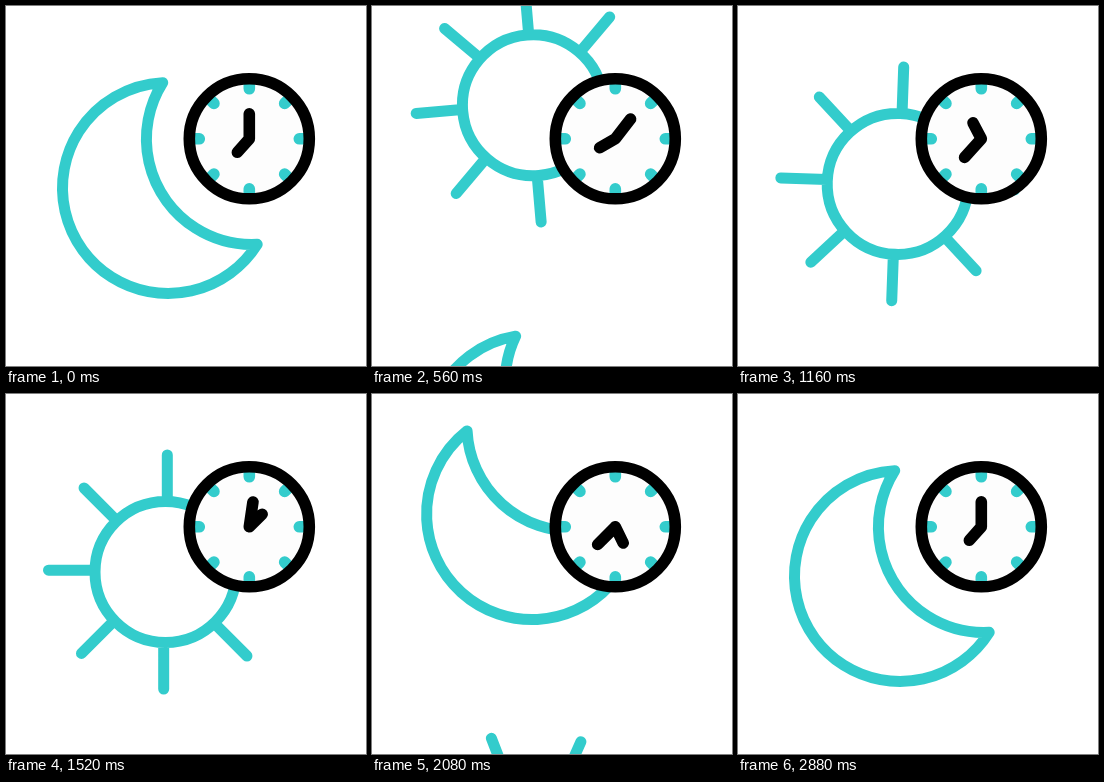
These frames come from a looping animation (360 by 360 pixels, 3 s). An HTML page with a canvas:

```html
<!DOCTYPE html>
<html>
<head>
<meta charset="utf-8">
<style>
  html, body { margin: 0; width: 100%; height: 100%; overflow: hidden; background: #fff; }
  canvas { display: block; }
</style>
</head>
<body>
<canvas id="stage" width="360" height="360"></canvas>
<script>
const ctx = document.getElementById('stage').getContext('2d');
const TEAL = '#33cccc', LOOP = 3000, STEP = 40, RAD = Math.PI / 180;

const progress = (t, start, length) => Math.min(1, Math.max(0, (t - start) / length));
const smooth = x => x * x * (3 - 2 * x);
const easeOut = x => 1 - (1 - x) ** 3.5;

function placed(x, y, degrees, draw) {
  ctx.save();
  ctx.translate(x, y);
  ctx.rotate(degrees * RAD);
  draw();
  ctx.restore();
}

function stroke(color, path) {
  ctx.strokeStyle = color;
  ctx.beginPath();
  path();
  ctx.stroke();
}

// Line outwards at a clockwise angle from twelve o'clock, shifted sideways by offset.
function spoke(degrees, from, to, offset = 0) {
  const s = Math.sin(degrees * RAD), c = -Math.cos(degrees * RAD);
  const dx = -c * offset, dy = s * offset;
  ctx.moveTo(from * s + dx, from * c + dy);
  ctx.lineTo(to * s + dx, to * c + dy);
}

function spokes(from, to, offset) {
  for (let a = 0; a < 360; a += 45) spoke(a, from, to, offset);
}

function moon(x, y, turn) {
  const r = 105.5, gap = 97.2, half = Math.acos(gap / 2 / r);
  placed(x, y, turn - 30.3, () => stroke(TEAL, () => {
    ctx.arc(0, 0, r, half, 2 * Math.PI - half);
    ctx.arc(gap, 0, r, Math.PI + half, Math.PI - half, true);
    ctx.closePath();
  }));
}

function sun(x, y, turn) {
  placed(x, y, turn, () => stroke(TEAL, () => {
    spokes(71, 117, 1.8);
    ctx.moveTo(70.5, 0);
    ctx.arc(0, 0, 70.5, 0, 2 * Math.PI);
  }));
}

function clock(turn) {
  placed(243.3, 132.8, 0, () => {
    ctx.lineWidth = 11.6;
    ctx.fillStyle = '#fdfdfd';
    ctx.beginPath();
    ctx.arc(0, 0, 60, 0, 2 * Math.PI);
    ctx.fill();
    stroke(TEAL, () => spokes(50, 58));
    stroke('#000', () => ctx.arc(0, 0, 60, 0, 2 * Math.PI));
    stroke('#000', () => {
      spoke(720 * turn, 0, 25);
      spoke(221.5 + 360 * turn, 0, 18);
    });
  });
}

function render(t) {
  const time = progress(t, 200, 2600);
  const spin = smooth(progress(t, 200, 2900));
  const settle = smooth(progress(t, 200, 2640));
  const x = 162 - 2.5 * Math.sin(Math.PI * time);
  const first = 331 * easeOut(progress(t, 200, 1070));
  const second = 338 * easeOut(progress(t, 1669, 1070));

  ctx.fillStyle = '#fff';
  ctx.fillRect(0, 0, 360, 360);
  ctx.lineWidth = 11;
  ctx.lineCap = ctx.lineJoin = 'round';

  if (second === 0) moon(x, 182 + first, -155 * spin);
  sun(x, -153 + first + second, 243 * spin - 105.2);
  if (second > 0) moon(x, -156 + second, -175 * (1 - settle));
  clock(smooth(time));
}

const origin = performance.now();
function tick() {
  const t = (performance.now() - origin) % LOOP;
  render(Math.floor(t / STEP) * STEP);
  requestAnimationFrame(tick);
}
tick();
</script>
</body>
</html>
```
